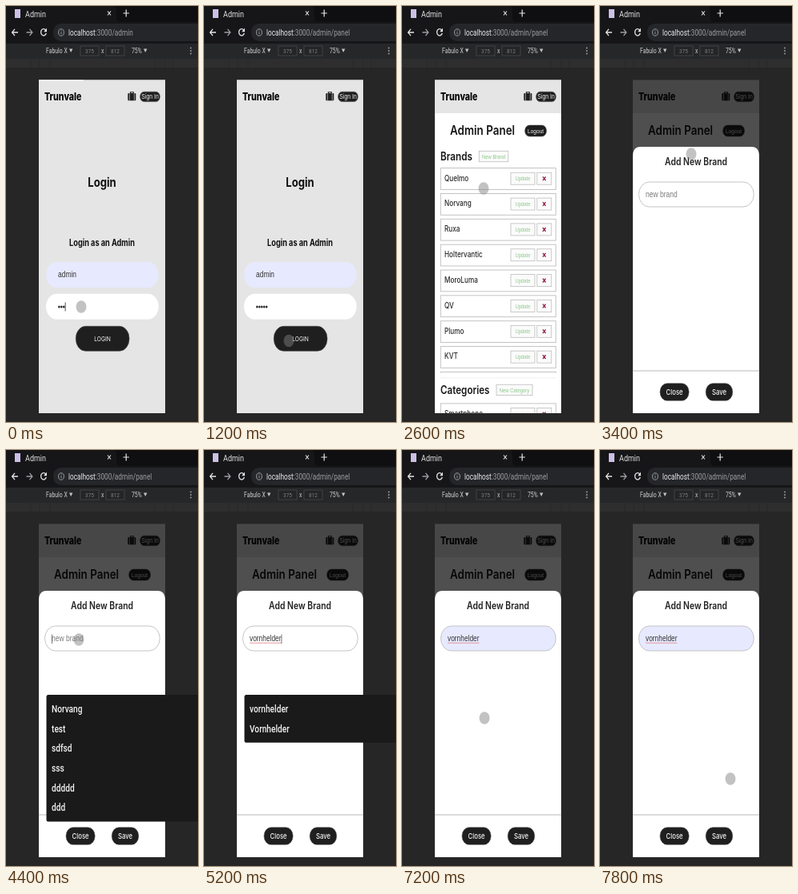
An HTML page that plays this animation: 240 by 520 pixels, repeating every 8000 ms.

```html
<!DOCTYPE html>
<html lang="en">
<head>
<meta charset="utf-8">
<title>Admin</title>
<style>
  html, body { margin: 0; width: 100%; height: 100%; overflow: hidden; background: #262626; }
  svg { display: block; width: 100%; height: 100%; }
  .head { font-family: Inter, "Open Sans", sans-serif; }
  .ui { font-family: Roboto, "Noto Sans", sans-serif; }
  .form { font-family: "Liberation Sans", Arial, sans-serif; }
</style>
</head>
<body>
<svg id="stage" viewBox="0 0 240 520" preserveAspectRatio="none"></svg>
<script>
const LOOP = 8000, STEP = 200;
const SQUEEZE = 0.82;
const INK = '#1f1f1f', PAGE = '#e5e5e5', FILLED = '#e7eaff', BAR = '#161618';
const LEFT = 41, TOP = 92.5, WIDTH = 158, HEIGHT = 416.5;
const WORD = 'vornhelder';
const BRANDS = ['Quelmo', 'Norvang', 'Ruxa', 'Holtervantic', 'MoroLuma', 'QV', 'Plumo', 'KVT', ''];
const HISTORY = ['Norvang', 'test', 'sdfsd', 'sss', 'ddddd', 'ddd'];
const MATCHES = [WORD, 'Vornhelder'];

const rect = (x, y, w, h, fill, extra = '') =>
  `<rect x="${x}" y="${y}" width="${w}" height="${h}" fill="${fill}" ${extra}/>`;

const round = (x, y, w, h, r, fill, extra = '') =>
  rect(x, y, w, h, fill, `rx="${r * SQUEEZE}" ry="${r}" ${extra}`);

const line = (d, color, w = 1, extra = '') =>
  `<path d="${d}" fill="none" stroke="${color}" stroke-width="${w}" ${extra}/>`;

function text(x, y, str, size, { font = 'head', fill = '#111', weight = 400, mid = false, id = '' } = {}) {
  return `<text ${id && `id="${id}"`} class="${font}" transform="translate(${x} ${y}) scale(${SQUEEZE} 1)" ` +
    `font-size="${size}" font-weight="${weight}" fill="${fill}" text-anchor="${mid ? 'middle' : 'start'}">${str}</text>`;
}

const group = (id, body, extra = '') => `<g id="${id}" ${extra}>${body}</g>`;

const pill = (x, y, w, h, r, label, size, base, opts = {}) =>
  round(x, y, w, h, r, INK, 'stroke="#4a4a4a" stroke-width=".5"') +
  text(x + w / 2, base, label, size, { fill: '#f4f4f4', mid: true, ...opts });

const outlineButton = (x, y, w, h, label) =>
  rect(x, y, w, h, '#fbfbfb', 'stroke="#bcbcbc" stroke-width=".8"') +
  text(x + w / 2, y + h / 2 + 2.6, label, 7.2, { font: 'form', fill: '#8cc88c', mid: true });

const triangle = (x, y) => `<path d="M${x} ${y}h4.4l-2.2 4.6z" fill="#c4c4c4"/>`;

function browser() {
  const gray = '#9a9da1', light = '#e4e5e7';
  const dims = [[93, '375'], [125, '812']].map(([x, s]) =>
    rect(x, 50, 23, 12, '#242526', 'stroke="#48494b" stroke-width=".8"') +
    text(x + 11.5, 59, s, 8, { font: 'ui', fill: '#7d7e80', mid: true })).join('');
  const ticks = [31, 42, 55, 186, 199, 209].map(x => line(`M${x} 66V77`, '#262626', 0.7)).join('');
  return rect(0, 0, 240, 20, '#0f0f11') +
    `<path d="M0 0H134Q138 0 138 6V14Q138 20 143 20H0Z" fill="${BAR}"/>` +
    rect(0, 20, 240, 27, BAR) +
    `<path d="M240 22H69Q59 23 59 33T69 44H240Z" fill="#252629"/>` +
    rect(11, 4, 7, 11, '#cdbfe6') +
    text(24, 13.5, 'Admin', 11, { font: 'ui', fill: '#dfe0e2' }) +
    line('M127 6.5l4 5M131 6.5l-4 5', light, 1.1) +
    line('M146.5 9h7.4M150.2 4.5v9', light, 1.2) +
    line('M15 33H8M11 28.8L7.6 33L11 37.2', light, 1.3) +
    line('M25.5 33H32.5M29.5 28.8L32.9 33L29.5 37.2', gray, 1.3) +
    line('M49.6 30A3.4 4.2 0 1 0 50.3 34', light, 1.3) +
    `<path d="M51 27.6v4.6h-3.8z" fill="${light}"/>` +
    `<ellipse cx="69" cy="33" rx="3.4" ry="4.2" fill="none" stroke="${gray}"/>` +
    line('M69 32.4v2.8M69 30.4v1', gray) +
    text(78, 36.5, `<tspan fill="#e8e9eb">localhost</tspan>:3000/admin<tspan id="path">/panel</tspan>`, 10.1, { font: 'ui', fill: gray }) +
    rect(0, 47, 240, 19, '#262729') +
    text(50, 59, 'Fabulo X', 8.4, { font: 'ui', fill: '#d0d0d0' }) + triangle(79, 53.5) +
    dims + text(120.8, 59, 'x', 8.5, { font: 'ui', fill: '#c4c4c4', mid: true }) +
    text(157, 59, '75%', 8.4, { font: 'ui', fill: '#d0d0d0' }) + triangle(172, 53.5) +
    [52.5, 56, 59.5].map(y => `<ellipse cx="231" cy="${y}" rx=".8" ry="1" fill="#b0b0b0"/>`).join('') +
    rect(0, 66, 240, 11, '#2e2e2e') + ticks +
    rect(0, 77, 240, 443, '#262626');
}

const sheet = fill => rect(LEFT, TOP, WIDTH, HEIGHT, fill);

function header() {
  return rect(LEFT, TOP, WIDTH, 41.5, PAGE) +
    text(48, 118, 'Trunvale', 13, { weight: 800, fill: '#050505' }) +
    line('M155.4 109.5v-1.8h4v1.8', INK, 1.1) +
    round(152.3, 109, 10, 9.3, 1.2, INK) +
    line('M154.4 109v9.3M160.3 109v9.3', PAGE, 0.6) +
    pill(167.6, 107.2, 24.8, 12.4, 6, 'Sign In', 8.4, 116.3, { font: 'form' });
}

function login() {
  return sheet(PAGE) +
    text(120, 226, 'Login', 16, { weight: 700, mid: true }) +
    text(120, 300.3, 'Login as an Admin', 11.2, { weight: 700, mid: true }) +
    round(50, 320, 140.7, 32, 16, FILLED) +
    text(65, 339.2, 'admin', 10.3, { font: 'form', fill: '#333' }) +
    round(50, 359.7, 140.7, 32, 16, '#fff') +
    group('dots', '') +
    round(87.3, 400.3, 66.7, 31, 15, INK, 'stroke="#444" stroke-width=".6"') +
    text(120.5, 418.5, 'LOGIN', 8.2, { fill: '#f4f4f4', mid: true });
}

function row(y, name) {
  return rect(48.3, y, 144, 26.8, '#fff', 'stroke="#bdbdbd" stroke-width=".9"') +
    text(53, y + 15.9, name, 10, { weight: 500, fill: '#2a2a2a' }) +
    outlineButton(136, y + 5.6, 30, 15, 'Update') +
    rect(168.8, y + 5.6, 18, 15, '#fbfbfb', 'stroke="#bcbcbc" stroke-width=".8"') +
    line(`M176 ${y + 10.7}l3.6 4.8M179.6 ${y + 10.7}l-3.6 4.8`, '#96244a', 1.4);
}

function panel() {
  return sheet('#fff') +
    text(60, 161, 'Admin Panel', 16.4, { weight: 600, fill: '#181818' }) +
    pill(153.6, 149, 27, 14, 7, 'Logout', 8, 159, { font: 'form' }) +
    text(48, 193, 'Brands', 14.3, { weight: 600, fill: '#181818' }) +
    outlineButton(96.3, 181.3, 36.5, 13.4, 'New Brand') +
    group('list', BRANDS.map((b, i) => row(202.6 + i * 31.85, b)).join(''), 'clip-path="url(#listClip)"') +
    group('bar', round(190, 205, 1.8, 227, 1, '#bdbdbd')) +
    line('M48 464.8H192', '#ededed', 0.8) +
    text(48, 484.8, 'Categories', 14.2, { weight: 600, fill: '#181818' }) +
    outlineButton(118, 473.2, 45, 13.4, 'New Category') +
    row(496.9, 'Smartphone');
}

function modal() {
  return '<path d="M41 510V188Q41 176 50.5 176H189.5Q199 176 199 188V510Z" fill="#fff"/>' +
    text(120, 199.3, 'Add New Brand', 12.7, { weight: 600, fill: '#222', mid: true }) +
    `<rect id="field" x="48.5" y="220" width="143.8" height="31" rx="13" ry="15.5" stroke="#bebebe" stroke-width=".9"/>` +
    text(57, 239, 'new brand', 10.4, { font: 'form', fill: '#7b7b7b', id: 'hint' }) +
    text(57, 239, '', 10.2, { font: 'form', fill: '#333', id: 'value' }) +
    `<path id="spell" fill="none" stroke="#e08a94" stroke-width=".9"/>` +
    `<path id="caret" stroke="#555" stroke-width=".8"/>` +
    line('M41 456H199', '#b2b2b2', 0.9) +
    pill(75, 471.7, 36.2, 21.6, 10.8, 'Close', 9.5, 485.8, { weight: 500 }) +
    pill(132.2, 471.7, 33.6, 21.6, 10.8, 'Save', 9.5, 485.8, { weight: 500 });
}

function options(items, hover) {
  const h = items.length * 24.7 + 10.4;
  return round(50.5, 306, 194, h, 2.5, '#1a1a1a') +
    (hover ? rect(50.5, 311.2, 189.5, 24.7, '#3a3a3a') : '') +
    items.map((s, i) => text(57, 327.8 + i * 24.7, s, 12.4, { font: 'ui', weight: 500, fill: '#f2f2f2' })).join('');
}

const stage = document.getElementById('stage');
stage.innerHTML =
  `<defs><clipPath id="phone"><rect x="${LEFT}" y="92" width="${WIDTH}" height="417"/></clipPath>
   <clipPath id="listClip"><rect x="41" y="200" width="158" height="258.8"/></clipPath></defs>` +
  browser() +
  group('screen',
    group('login', login()) + group('panel', panel()) + header() +
    group('loading', rect(LEFT, TOP, 56, 1.2, '#fafafa')) +
    group('shade', rect(LEFT, 92, WIDTH, 418, '#000')) +
    group('modal', modal()), 'clip-path="url(#phone)"') +
  group('menu', '') +
  '<ellipse id="cursor" rx="6.5" ry="7.7" fill="#808080" fill-opacity=".48"/>';

const $ = id => document.getElementById(id);
const show = (id, on) => $(id).setAttribute('display', on ? 'inline' : 'none');
const clamp = v => Math.min(1, Math.max(0, v));
const smooth = v => v * v * (3 - 2 * v);

// time, x, y
const PATH = [
  [0, 94, 376], [400, 94, 376], [1000, 108, 424], [1400, 104, 413],
  [1800, 104, 405], [2600, 102, 228], [3000, 114, 187], [3400, 114, 185], [3600, 114, 185],
  [4200, 91, 237], [6200, 91, 238], [6600, 91, 284], [6800, 92, 321], [7000, 92, 321], [7800, 163, 411]
];

function cursorAt(t) {
  const i = PATH.findIndex(p => p[0] > t);
  if (i < 0) return PATH[PATH.length - 1].slice(1);
  const [t0, x0, y0] = PATH[i - 1], [t1, x1, y1] = PATH[i];
  const k = smooth((t - t0) / (t1 - t0));
  return [x0 + (x1 - x0) * k, y0 + (y1 - y0) * k];
}

function typedAt(t) {
  if (t < 4800) return '';
  return WORD.slice(0, Math.min(WORD.length, 3 + Math.floor((t - 4800) / 200) * 4));
}

function drawLogin(t) {
  const n = Math.min(5, 3 + Math.floor(t / 200));
  const caret = t < 800;
  $('dots').innerHTML = Array.from({ length: n }, (_, i) =>
    `<ellipse cx="${66.4 + i * 2.95}" cy="376" rx="1.25" ry="1.5" fill="#222"/>`).join('') +
    (caret ? line(`M${65.3 + n * 2.95} 370.5v11`, '#222', 0.8) : '');
}

function drawModal(t) {
  const open = clamp((t - 2800) / 500);
  $('shade').setAttribute('opacity', 0.69 * clamp((t - 2800) / 400));
  $('modal').setAttribute('transform', `translate(0 ${334 * (1 - open) ** 3})`);
  show('modal', open > 0);

  const word = typedAt(t);
  const filled = t >= 6800;
  const focused = t >= 4200 && t < 6800 && !(t >= 5600 && t < 6200);
  $('value').textContent = word;
  const end = 57 + (word ? $('value').getComputedTextLength() * SQUEEZE : 0);
  show('hint', !word);
  show('spell', word);
  show('caret', focused);
  $('field').setAttribute('fill', filled ? FILLED : '#fff');
  $('spell').setAttribute('d', `M57 241.2H${end}`);
  $('caret').setAttribute('d', `M${end + 0.5} 230.5v11.5`);

  const menu = t >= 4200 && t < 7200;
  $('menu').innerHTML = menu ? options(word ? MATCHES : HISTORY, filled) : '';
}

function draw(time) {
  const t = Math.floor((time % LOOP) / STEP) * STEP;
  show('path', t >= 1200);
  show('login', t < 1400);
  show('panel', t >= 1400);
  show('loading', t < 1200);
  $('bar').setAttribute('opacity', 1 - clamp((t - 1800) / 600));
  if (t < 1400) drawLogin(t);
  drawModal(t);

  const [x, y] = cursorAt(t);
  $('cursor').setAttribute('cx', x);
  $('cursor').setAttribute('cy', y);
  show('cursor', t < 4800 || t >= 6200);
}

const start = performance.now();
function tick() {
  draw(performance.now() - start);
  requestAnimationFrame(tick);
}
tick();
</script>
</body>
</html>
```
